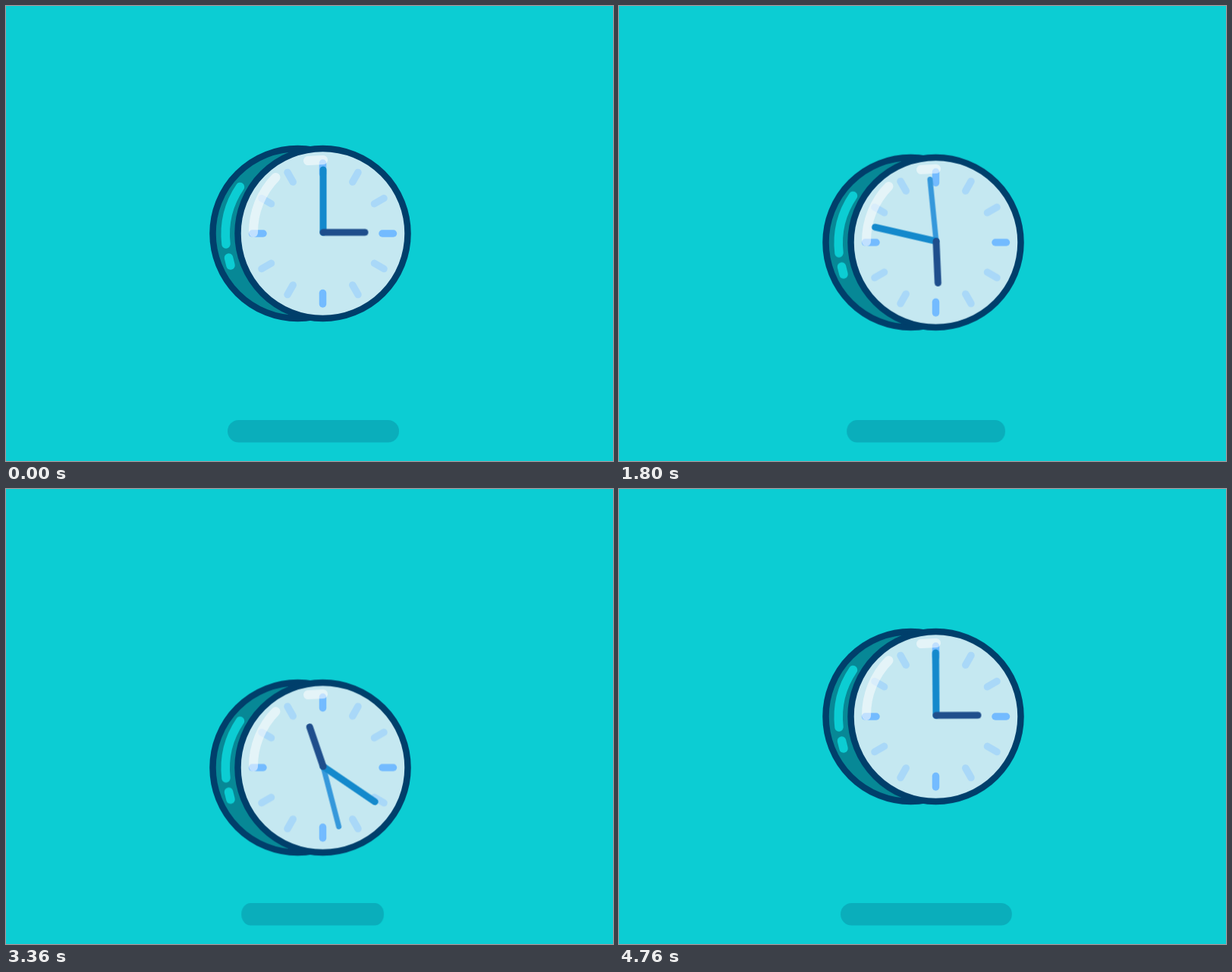
These frames come from a looping animation (800 px wide and 600 px high, 4.8 s). An HTML page without scripts:

```html
<!DOCTYPE html>
<html lang="en">
<head>
<meta charset="utf-8">
<title>Bouncing clock</title>
<style>
  html, body { margin: 0; width: 100%; height: 100%; overflow: hidden; background: #0ccdd3; }
  svg { display: block; width: 100%; height: 100%; }
  .line { fill: none; stroke-linecap: round; }
  .rim { stroke: #003f6b; stroke-width: 8.5; }
  .clock, .shadow, .hand { animation: 4800ms linear infinite; }
  .hand { transform-origin: 418px 298.5px; }

  .clock { animation-name: bounce; }
  @keyframes bounce {
    0% { transform: translateY(0); animation-timing-function: cubic-bezier(.57, 0, .94, 1); }
    24.58% { transform: translateY(67.5px); animation-timing-function: cubic-bezier(.36, 0, .31, 1); }
    46.67% { transform: translateY(0); animation-timing-function: cubic-bezier(.6, 0, .72, 1); }
    69.58% { transform: translateY(67.5px); animation-timing-function: cubic-bezier(.2, 0, .05, 1); }
    100% { transform: translateY(0); }
  }

  .shadow { transform-origin: 400px 561px; animation-name: shrink; }
  @keyframes shrink {
    0%, 46.67% { transform: scaleX(1); animation-timing-function: cubic-bezier(.35, .1, .65, .75); }
    24.58% { transform: scaleX(.83); animation-timing-function: cubic-bezier(.35, .1, .65, .75); }
    69.58% { transform: scaleX(.83); animation-timing-function: cubic-bezier(.35, .17, .59, .97); }
    100% { transform: scaleX(1); }
  }

  .hour { animation-name: hour; animation-timing-function: cubic-bezier(.405, 0, .773, 1); }
  @keyframes hour {
    from { transform: rotate(90deg); }
    to { transform: rotate(450deg); }
  }

  .minute { animation-name: minute; }
  @keyframes minute {
    0% { transform: rotate(0deg); animation-timing-function: cubic-bezier(.475, 0, .717, 1); }
    50% { transform: rotate(360deg); animation-timing-function: cubic-bezier(.31, 0, .72, 1); }
    100% { transform: rotate(720deg); }
  }

  .second { animation-name: second; }
  @keyframes second {
    0% { transform: rotate(0deg); animation-timing-function: cubic-bezier(.52, 0, .45, 1); }
    20% { transform: rotate(360deg); animation-timing-function: cubic-bezier(.517, 0, .392, 1); }
    40% { transform: rotate(720deg); animation-timing-function: cubic-bezier(.59, 0, .46, 1); }
    60% { transform: rotate(1080deg); animation-timing-function: cubic-bezier(.59, 0, .46, 1); }
    80% { transform: rotate(1440deg); animation-timing-function: cubic-bezier(.5, 0, .55, 1); }
    100% { transform: rotate(1800deg); }
  }
</style>
</head>
<body>
<svg viewBox="0 0 800 600">
  <defs>
    <path id="tick" d="M0-93V-78.5"/>
    <g id="pair">
      <use href="#tick" transform="rotate(30)"/>
      <use href="#tick" transform="rotate(60)"/>
    </g>
  </defs>

  <rect class="shadow" x="292" y="546" width="226" height="29.5" rx="14.75" fill="#0aaebb"/>

  <g class="clock">
    <circle class="rim" cx="384.5" cy="300" r="112" fill="#078896"/>
    <path class="line" d="M308.5 238.5A112 112 0 0 0 290 314M293.5 332L296 342" stroke="#0ccdd3" stroke-width="11.5"/>
    <circle class="rim" cx="417.5" cy="300" r="112" fill="#c5e8f1"/>

    <g class="line" transform="translate(417.5 300)" stroke-width="9.5">
      <g stroke="#73bbff">
        <use href="#tick"/>
        <use href="#tick" transform="rotate(90)"/>
        <use href="#tick" transform="rotate(180)"/>
        <use href="#tick" transform="rotate(270)"/>
      </g>
      <g stroke="#a9d8f8">
        <use href="#pair"/>
        <use href="#pair" transform="rotate(90)"/>
        <use href="#pair" transform="rotate(180)"/>
        <use href="#pair" transform="rotate(270)"/>
      </g>
    </g>

    <path class="line" d="M355.5 226A103 103 0 0 0 326 299M398 204L418 203" stroke="#fff" stroke-opacity=".55" stroke-width="12"/>

    <path class="line hand second" d="M418 298.5V216.5" stroke="#3598db" stroke-width="7"/>
    <path class="line hand minute" d="M418 298.5V216" stroke="#1489cc" stroke-width="9"/>
    <path class="line hand hour" d="M418 298.5V243.5" stroke="#1f4e8c" stroke-width="9"/>
  </g>
</svg>
</body>
</html>
```
